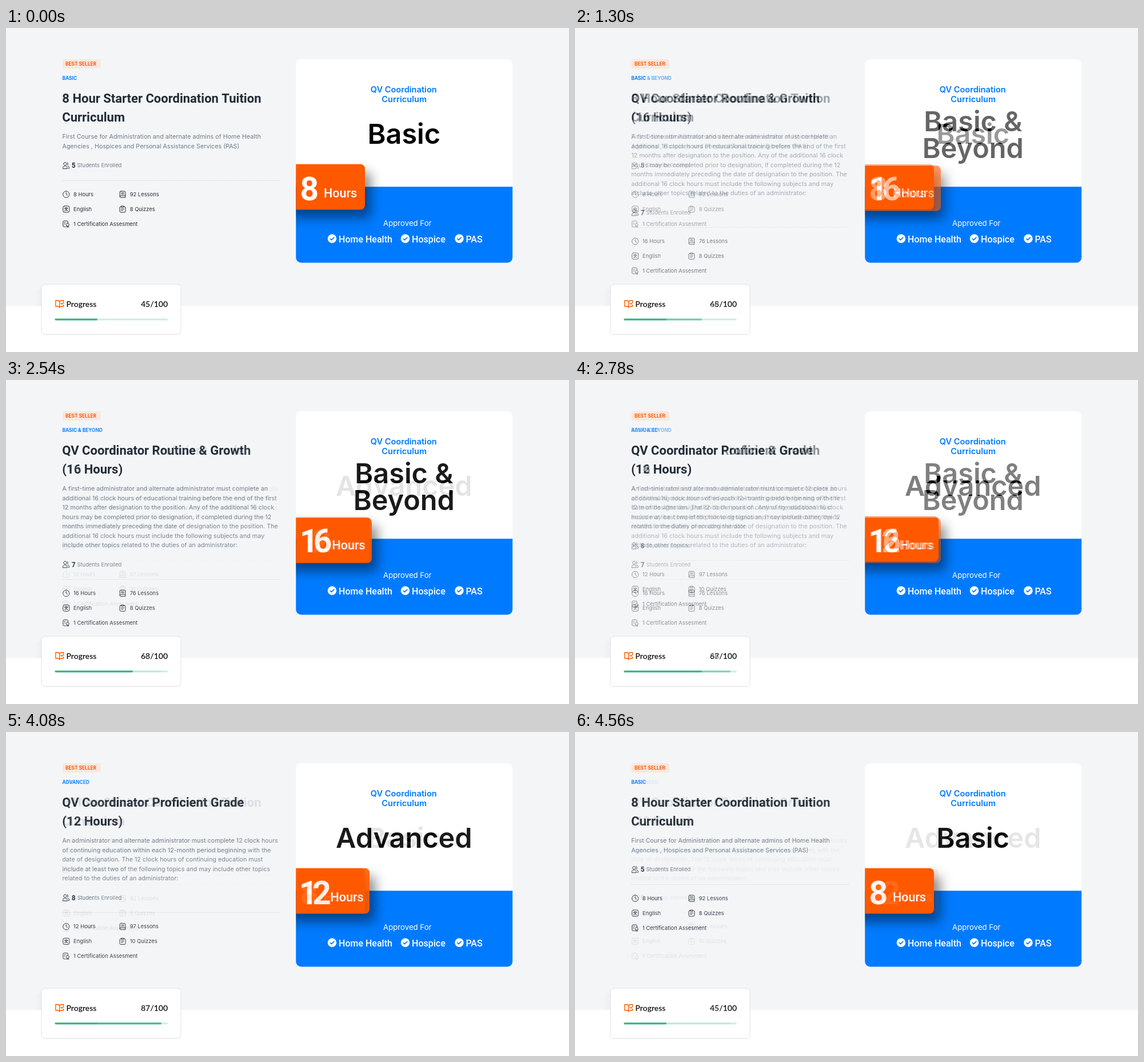
Recreate the animation shown at these times as an HTML page with a canvas. Size 985 px wide and 568 px high, loop 4620 ms.

```html
<!DOCTYPE html>
<html lang="en">
<head>
<meta charset="utf-8">
<title>Course cards</title>
<style>
html, body { margin: 0; width: 100%; height: 100%; overflow: hidden; background: #fff; }
canvas { display: block; width: 985px; height: 568px; }
</style>
</head>
<body>
<canvas id="stage" width="985" height="568"></canvas>
<script>
const W = 985, H = 568;
const HOLD = 1000, STEP = 60, SLOT = 1540;
const ORANGE = '#ff5900', BLUE = '#007bff', INK = '#212b36', GREY = '#6f7b89', PAGE = '#f4f5f7';
const inter = (size, weight = 400) => `${weight} ${size}px Inter, sans-serif`;
const roboto = (size, weight = 400) => `${weight} ${size}px Roboto, sans-serif`;
const lato = size => `600 ${size}px Lato, sans-serif`;

const slides = [
  {
    level: 'BASIC',
    title: ['8 Hour Starter Coordination Tuition', 'Curriculum'],
    text: [
      'First Course for Administration and alternate admins of Home Health',
      'Agencies , Hospices and Personal Assistance Services (PAS)'
    ],
    students: 5, hours: 8, lessons: 92, quizzes: 8,
    cover: ['Basic'], tag: { right: 628, top: 238.7, num: 514.5, label: 556 },
    progress: 45, bar: 160
  },
  {
    level: 'BASIC & BEYOND',
    title: ['QV Coordinator Routine & Growth', '(16 Hours)'],
    text: [
      'A first-time administrator and alternate administrator must complete an',
      'additional 16 clock hours of educational training before the end of the first',
      '12 months after designation to the position. Any of the additional 16 clock',
      'hours may be completed prior to designation, if completed during the 12',
      'months immediately preceding the date of designation to the position. The',
      'additional 16 clock hours must include the following subjects and may',
      'include other topics related to the duties of an administrator:'
    ],
    students: 7, hours: 16, lessons: 76, quizzes: 8,
    cover: ['Basic &', 'Beyond'], tag: { right: 640, top: 241.3, num: 514, label: 570.5 },
    progress: 68, bar: 222
  },
  {
    level: 'ADVANCED',
    title: ['QV Coordinator Proficient Grade', '(12 Hours)'],
    text: [
      'An administrator and alternate administrator must complete 12 clock hours',
      'of continuing education within each 12-month period beginning with the',
      'date of designation. The 12 clock hours of continuing education must',
      'include at least two of the following topics and may include other topics',
      'related to the duties of an administrator:'
    ],
    students: 8, hours: 12, lessons: 97, quizzes: 10,
    cover: ['Advanced'], tag: { right: 636, top: 238.7, num: 512.5, label: 567.5 },
    progress: 87, bar: 272
  }
];

// Line icons in a 12 by 12 box
const icons = {
  users: 'M4.3 .6a2.6 2.6 0 1 0 .01 0M.5 11.3C.3 8 2 6.9 4.3 6.9S8.3 8 8.1 11.3ZM7.8 .8a2.5 2.5 0 0 1 0 4.7M9.3 7.2C11 7.6 11.7 8.8 11.5 11H10',
  clock: 'M6 .4a5.6 5.6 0 1 0 .01 0M6 2.9V6.2L8.2 7.5',
  language: 'M3 .5H9Q11.5 .5 11.5 3V9Q11.5 11.5 9 11.5H3Q.5 11.5 .5 9V3Q.5 .5 3 .5ZM3 4.2H9M6 2.8V4.2M8 4.2Q7 8 3.2 9M4 4.2Q5 8 8.9 9',
  book: 'M3 .5H9.2Q10.8 .5 10.8 2V11.5H3Q1.2 11.5 1.2 9.8V2.3Q1.2 .5 3 .5ZM1.2 9.8Q1.4 8.3 3 8.3H10.8M3.8 3.2H8.2M3.8 5.4H8.2',
  quiz: 'M4 1.5H3Q1 1.5 1 3.5V9.5Q1 11.5 3 11.5H9Q11 11.5 11 9.5V3.5Q11 1.5 9 1.5H8M4 .5H8V2.6H4ZM3.6 5.5H8.4M3.6 8H6.8',
  award: 'M5 11H2.2Q.6 11 .6 9.4V2.2Q.6 .6 2.2 .6H7.5Q9.1 .6 9.1 2.2V4M2.8 3.5H4.5M2.8 6H4M8.5 4.6a2.6 2.6 0 1 0 .01 0M7 9.3V11.7L8.5 11L10 11.7V9.3'
};

function makeCanvas() {
  const canvas = document.createElement('canvas');
  canvas.width = W;
  canvas.height = H;
  return canvas;
}

function paintSlide(slide) {
  const canvas = makeCanvas(), c = canvas.getContext('2d');

  function write(str, x, y, font, color, align = 'left', spacing = 0) {
    c.font = font;
    c.fillStyle = color;
    c.textAlign = align;
    c.letterSpacing = spacing + 'px';
    c.fillText(str, x, y);
  }
  function fillBox(x, y, w, h, radius, color) {
    c.beginPath();
    c.roundRect(x, y, w, h, radius);
    c.fillStyle = color;
    c.fill();
  }
  function stroke(path, x, y, color = INK, width = 1) {
    c.save();
    c.translate(x, y);
    c.strokeStyle = color;
    c.lineWidth = width;
    c.lineCap = c.lineJoin = 'round';
    c.stroke(new Path2D(path));
    c.restore();
  }
  function fact(icon, label, x, y) {
    stroke(icons[icon], x, y - 6);
    write(label, x + 18.7, y + 3.4, inter(9.4), '#27313d');
  }

  function paintDetails() {
    fillBox(99, 55, 66, 16, 3, '#fbe6dd');
    write('BEST SELLER', 104, 66, inter(8.35, 700), ORANGE);
    write(slide.level, 98.5, 91, inter(8.35, 700), BLUE);
    slide.title.forEach((line, i) => write(line, 98.3, 131 + 33 * i, roboto(22, 700), INK));
    slide.text.forEach((line, i) => write(line, 98.5, 194.3 + 16.45 * i, inter(10.75), GREY));

    const y = 241 + 16.45 * (slide.text.length - 2);
    stroke(icons.users, 99, y - 6);
    write(slide.students, 114.8, y + 4.4, roboto(12, 700), INK);
    write('Students Enrolled', 124.5, y + 3.4, inter(9.4), GREY);

    c.strokeStyle = '#dee1e5';
    c.lineWidth = 1;
    c.setLineDash([3, 1]);
    c.beginPath();
    c.moveTo(98, Math.round(y + 26) + .5);
    c.lineTo(480, Math.round(y + 26) + .5);
    c.stroke();
    c.setLineDash([]);

    const row = y + 50.6;
    fact('clock', slide.hours + ' Hours', 99.3, row);
    fact('book', slide.lessons + ' Lessons', 198, row);
    fact('language', 'English', 99.3, row + 26);
    fact('quiz', slide.quizzes + ' Quizzes', 198, row + 26);
    fact('award', '1 Certification Assesment', 99.3, row + 52);
  }

  function paintCover() {
    c.save();
    c.beginPath();
    c.roundRect(507.3, 54.7, 378.9, 356.7, 9);
    c.clip();
    c.fillStyle = '#fff';
    c.fillRect(507, 54, 380, 225);
    c.fillStyle = BLUE;
    c.fillRect(507, 278.3, 380, 134);

    const { right, top, num, label } = slide.tag;
    c.shadowColor = 'rgba(0,0,0,.45)';
    c.shadowOffsetX = 10.5;
    c.shadowOffsetY = 14.5;
    c.shadowBlur = 20;
    fillBox(480, top, right - 480, 79.8, 8, ORANGE);
    c.restore();

    write(slide.hours, num, 301.5, roboto(57, 600), '#fff', 'left', -9);
    write('Hours', label, 296.5, roboto(21.5, 500), '#fff');

    write('QV Coordination', 695.7, 113, inter(14.6, 600), BLUE, 'center');
    write('Curriculum', 696.7, 129.5, inter(14.6, 600), BLUE, 'center');
    const first = slide.cover.length > 1 ? 181 : 203;
    slide.cover.forEach((line, i) => write(line, 696.3, first + 46.5 * i, inter(48.6, 600), '#000', 'center'));

    write('Approved For', 702.3, 347, inter(13.2), '#fff', 'center');
    const checks = [['Home Health', 570.5], ['Hospice', 698.5], ['PAS', 793]];
    for (const [name, x] of checks) {
      fillBox(x - 7.7, 361.6, 15.4, 15.4, 7.7, '#fff');
      stroke('M-3.2 .2L-1 2.4L3.3-2', x, 369.3, BLUE, 1.7);
      write(name, x + 11.5, 375.8, roboto(16, 500), '#fff');
    }
  }

  function paintProgress() {
    const haze = c.createLinearGradient(51, 0, 63, 0);
    haze.addColorStop(0, 'rgba(30,70,80,0)');
    haze.addColorStop(1, 'rgba(30,70,80,.04)');
    c.fillStyle = haze;
    c.fillRect(51, 458, 12, 29);

    fillBox(62, 449.3, 244, 88.2, 6, '#fff');
    c.strokeStyle = '#dfe1e4';
    c.lineWidth = 1;
    c.stroke();

    stroke('M7.5 2.5Q6 .7 3.5 .7H.7V11H4.5Q7 11 7.5 13Q8 11 10.5 11H14.5V8.5M7.5 2.5V13M7.5 2.5Q9 .7 11.5 .7H14.5V2.5M10 5.5L11.7 7.2L15 4',
      86.2, 477, ORANGE, 1.4);
    write('Progress', 105.5, 489.3, lato(13.9), '#111');
    write(slide.progress + '/100', 283, 489.3, lato(14), '#111', 'right');
    fillBox(85.5, 509.6, 197.5, 2.8, 1.4, '#c9efe1');
    fillBox(85.5, 509.6, slide.bar - 85.5, 2.8, 1.4, '#2fb380');
  }

  c.fillStyle = '#fff';
  c.fillRect(0, 0, W, H);
  c.fillStyle = PAGE;
  c.fillRect(0, 0, W, 487.5);
  paintDetails();
  paintCover();
  paintProgress();
  return canvas;
}

const pictures = slides.map(paintSlide);
const stage = document.getElementById('stage').getContext('2d');

// Each slide holds, then dissolves into the next in tenths
function render() {
  const t = performance.now() % (SLOT * slides.length);
  const index = Math.floor(t / SLOT);
  const fade = t % SLOT - HOLD;
  stage.globalAlpha = 1;
  stage.drawImage(pictures[index], 0, 0);
  if (fade >= 0) {
    stage.globalAlpha = (Math.floor(fade / STEP) + 1) / 10;
    stage.drawImage(pictures[(index + 1) % slides.length], 0, 0);
  }
  requestAnimationFrame(render);
}
render();
</script>
</body>
</html>
```
